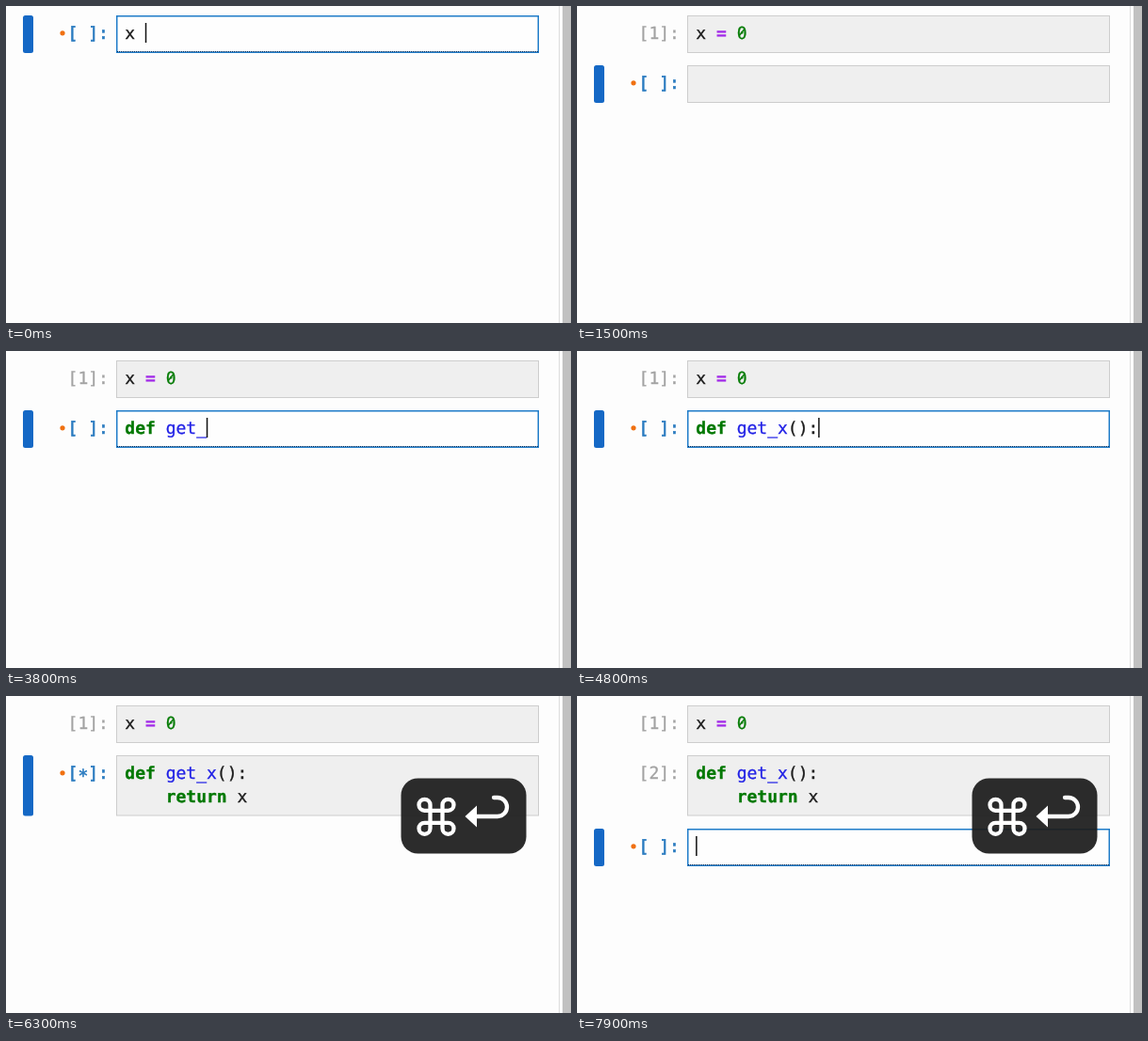
Recreate the animation shown at these times as an HTML page. Size 600 px wide and 337 px high, loop 8 s.

```html
<!DOCTYPE html>
<html lang="en">
<head>
<meta charset="utf-8">
<title>Notebook typing</title>
<style>
  html, body { margin: 0; width: 100%; height: 100%; overflow: hidden; background: #fdfdfd; }
  svg { display: block; }
  text {
    font: 18px "DejaVu Sans Mono", monospace;
    white-space: pre;
    text-rendering: geometricPrecision;
    color: #1c1c1c;
  }
  text, tspan { fill: currentColor; stroke: currentColor; stroke-width: .3; }
  .cell { fill: #efefef; stroke: #cdcdcd; stroke-width: 1; }
  .cell.edit { fill: #fefefe; stroke: #1f7cc9; stroke-width: 1.5; }
  .dots { stroke: #0c2950; stroke-width: 1; stroke-dasharray: 1 1; }
  .bar { fill: #1568c5; }
  .dirty { fill: #f07010; }
  .prompt { color: #a2a2a2; }
  .prompt.active { color: #2a7bc0; stroke-width: .6; }
  .caret { fill: #111; }
  .kw { color: #007800; font-weight: bold; }
  .op { color: #a22be8; font-weight: bold; }
  .num { color: #087d08; }
  .fn { color: #2222e6; }
  .slash { stroke: #087d08; stroke-width: 1.5; }
  #keys { animation: keys 8s step-end infinite; }
  @keyframes keys { 0% { visibility: hidden; } 77.5%, 100% { visibility: visible; } }
</style>
</head>
<body>
<svg width="600" height="337" viewBox="0 0 600 337">
  <rect width="600" height="337" fill="#fdfdfd"/>
  <rect x="587" width="1" height="337" fill="#dcdcdc"/>
  <rect x="591" width="9" height="337" fill="#c1c1c1"/>
  <g id="book"></g>
  <g id="keys">
    <rect x="419.5" y="87.5" width="133" height="80" rx="18" fill="#1c1c1c" fill-opacity=".93"/>
    <path transform="translate(457 128.3)" fill="none" stroke="#fff" stroke-width="4.3"
      d="M-12.5-6.5H12.5A6 6 0 1 0 6.5-12.5V12.5A6 6 0 1 0 12.5 6.5H-12.5A6 6 0 1 0-6.5 12.5V-12.5A6 6 0 1 0-12.5-6.5Z"/>
    <path d="M497 128H522a10 10 0 0 0 0-20H518" fill="none" stroke="#fff" stroke-width="4.3" stroke-linecap="round"/>
    <path d="M487.5 128L500 116.5V139.5Z" fill="#fff"/>
  </g>
</svg>
<script>
const LOOP = 8000, LEAD = 40, CHAR = 10.837, LINE = 25, LEFT = 126.3;
const book = document.getElementById('book');

// Typing: [ms, characters visible]; ran = [busy, done]
const cells = [
  { top: 10, born: 0, edit: 0, ran: [800, 1000], label: 1, code: 'x = 0',
    keys: [[0, 2], [100, 3], [200, 4], [400, 5]] },
  { top: 63, born: 1300, edit: 2000, ran: [6200, 6500], label: 2, code: 'def get_x():\n    return x',
    keys: [[2600, 1], [2800, 2], [3000, 3], [3200, 4], [3400, 5], [3500, 6], [3600, 7], [3800, 8],
           [4100, 9], [4300, 10], [4500, 11], [4700, 12], [5100, 17], [5300, 18], [5400, 19],
           [5500, 20], [5600, 21], [5700, 22], [5800, 23], [5900, 24], [6000, 25]] },
  { top: 141, born: 7200, edit: 7500, ran: [LOOP, LOOP], label: 3, code: '', keys: [] }
];

const span = (cls, s) => `<tspan class="${cls}">${s}</tspan>`;

function highlight(line) {
  return line
    .replace(/=/g, '\u0001')
    .replace(/^def( +)(\w+)/, (m, gap, name) => 'def' + gap + span('fn', name))
    .replace(/(^| )(def|return)(?= |$)/, (m, gap, word) => gap + span('kw', word))
    .replace(/\b0\b/g, span('num', '0'))
    .replace(/\u0001/g, span('op', '='));
}

function prompt(cell, t, active) {
  const y = cell.top + 18.8;
  const [busy, done] = cell.ran;
  const mark = t >= done ? cell.label : ' ';
  const cls = active ? 'prompt active' : 'prompt';
  let out = `<text class="${cls}" x="65.6" y="${y + 6}">[${mark}]:</text>`;
  if (t >= busy && t < done)
    out += `<text class="${cls}" x="${65.6 + CHAR}" y="${y + 9.3}">*</text>`;
  if (active && t < done) out += `<circle class="dirty" cx="60" cy="${y}" r="2.6"/>`;
  return out;
}

function drawCell(cell, t, active) {
  const count = cell.keys.reduce((n, [at, k]) => t >= at ? k : n, 0);
  const lines = cell.code.slice(0, count).split('\n');
  const { top } = cell;
  const height = 40 + (lines.length - 1) * 24.5;
  const editing = t >= cell.edit && t < cell.ran[0];
  const inset = editing ? .75 : .5;
  let out = '';
  if (active) out += `<rect class="bar" x="18" y="${top}" width="11" height="${height}" rx="2.5"/>`;
  out += prompt(cell, t, active);
  out += `<rect class="cell${editing ? ' edit' : ''}" x="${117 + inset}" y="${top + inset}"
    width="${449 - 2 * inset}" height="${height - 2 * inset}"/>`;
  if (editing) out += `<path class="dots" d="M118 ${top + height - 1.5}H565"/>`;
  lines.forEach((line, i) => {
    const y = top + 24.6 + i * LINE;
    out += `<text x="${LEFT}" y="${y}">${highlight(line)}</text>`;
    const zero = line.indexOf('0');
    if (zero >= 0) {
      const x = LEFT + (zero + .5) * CHAR;
      out += `<path class="slash" d="M${x - 2.6} ${y - 3.4}L${x + 2.6} ${y - 9.8}"/>`;
    }
  });
  if (editing) {
    const row = lines.length - 1;
    const x = LEFT + lines[row].length * CHAR - .2;
    out += `<rect class="caret" x="${x}" y="${top + 8 + row * LINE}" width="1.5" height="21"/>`;
  }
  return out;
}

let shown = '';
function render(now) {
  // A short lead keeps each step on time despite display lag
  const t = Math.min(now % LOOP + LEAD, LOOP - 1);
  const live = cells.filter(c => t >= c.born);
  const html = live.map((c, i) => drawCell(c, t, i === live.length - 1)).join('');
  if (html !== shown) book.innerHTML = shown = html;
}

const clock = document.getElementById('keys').getAnimations()[0];
function tick(now) {
  render(clock && clock.currentTime !== null ? +clock.currentTime : now);
  requestAnimationFrame(tick);
}
render(0);
requestAnimationFrame(tick);
</script>
</body>
</html>
```
